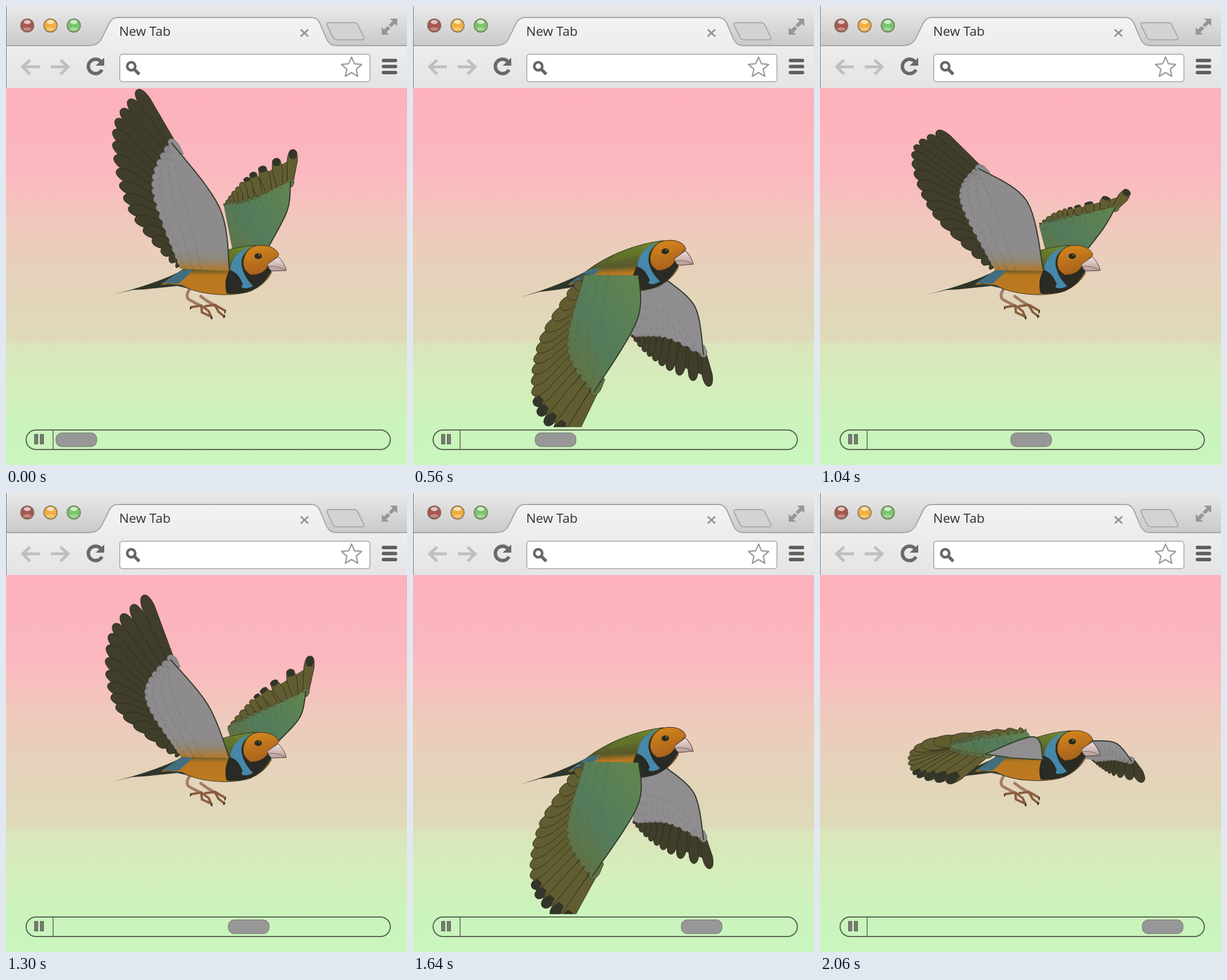
Recreate the animation shown at these times as an HTML page. Size 698 by 800 pixels, loop 2.2 s.

```html
<!DOCTYPE html>
<html lang="en">
<head>
<meta charset="utf-8">
<title>Flying finch</title>
<style>
html, body { margin: 0; width: 100%; height: 100%; overflow: hidden; }
svg { display: block; width: 698px; height: 800px; }
text { font: 22.5px "Open Sans", "Noto Sans", sans-serif; fill: #33332c; }
</style>
</head>
<body>
<svg viewBox="0 0 698 800" xmlns="http://www.w3.org/2000/svg">
  <defs>
    <linearGradient id="sky" gradientUnits="userSpaceOnUse" x1="0" y1="143" x2="0" y2="800">
      <stop offset="0" stop-color="#fdb1bc"/><stop offset=".2" stop-color="#fbb7be"/>
      <stop offset=".25" stop-color="#fabbbf"/><stop offset=".36" stop-color="#f0c8bc"/>
      <stop offset=".5" stop-color="#e5d2ba"/><stop offset=".67" stop-color="#dedaba"/>
      <stop offset=".68" stop-color="#dae5bb"/><stop offset=".78" stop-color="#d5edbb"/>
      <stop offset=".88" stop-color="#ccf3bc"/><stop offset="1" stop-color="#c9f6be"/>
    </linearGradient>
    <linearGradient id="strip" x2="0" y2="1">
      <stop stop-color="#e9e9e9"/><stop offset="1" stop-color="#c9c9c9"/>
    </linearGradient>
    <linearGradient id="tools" gradientUnits="userSpaceOnUse" x1="0" y1="20" x2="0" y2="143">
      <stop stop-color="#f3f3f3"/><stop offset="1" stop-color="#e4e4e4"/>
    </linearGradient>
    <linearGradient id="under" gradientUnits="userSpaceOnUse" x1="0" y1="425" x2="0" y2="464">
      <stop stop-color="#8e8b8e"/><stop offset=".45" stop-color="#8f8878"/><stop offset="1" stop-color="#b8761f"/>
    </linearGradient>
    <linearGradient id="top" x1="0" y1="1" x2="1" y2="0">
      <stop stop-color="#66703a"/><stop offset=".45" stop-color="#547c5c"/><stop offset="1" stop-color="#62854f"/>
    </linearGradient>
    <linearGradient id="plumage" gradientUnits="userSpaceOnUse" x1="0" y1="412" x2="0" y2="505">
      <stop stop-color="#76942a"/><stop offset=".3" stop-color="#5d6b2d"/><stop offset=".5" stop-color="#59592b"/>
      <stop offset=".62" stop-color="#b97720"/><stop offset="1" stop-color="#bd7a20"/>
    </linearGradient>
    <linearGradient id="face" x2=".3" y2="1">
      <stop stop-color="#d8891c"/><stop offset="1" stop-color="#a8621c"/>
    </linearGradient>
    <linearGradient id="bill" x2="0" y2="1">
      <stop stop-color="#efe0dc"/><stop offset="1" stop-color="#b59a97"/>
    </linearGradient>
    <clipPath id="view"><rect y="143" width="698" height="591"/></clipPath>
  </defs>

  <rect y="143" width="698" height="657" fill="url(#sky)"/>

  <g clip-path="url(#view)" stroke-linejoin="round">
    <g id="far"></g>
    <g fill="none" stroke="#8a5c3c" stroke-width="5" stroke-linecap="round">
      <path d="M322 490Q310 506 319 512L340 523M339 506L350 514L365 523" stroke="#a27c68"/>
      <path d="M322 525L340 522L353 532L358 544M340 522L341 534L354 540M347 523L364 521L381 531M364 522L370 533L380 541" stroke-width="4"/>
      <path d="M358 541v4M380 539l-1 4M382 531l-1 4M322 525l-1 3" stroke="#3b2f25" stroke-width="2"/>
    </g>
    <g id="body">
      <path d="M308 460Q265 483 186 503L220 495L240 494L308 487Z" fill="#30362a"/>
      <path d="M436 417C390 420 340 436 302 463L268 486Q300 484 322 494C350 504 395 507 426 497Q452 485 462 465Z" fill="url(#plumage)" stroke="#34361f"/>
      <path d="M303 462L272 483L300 484Q318 470 326 458Z" fill="#426e80"/>
      <path d="M272 483L306 486L320 493L298 488Z" fill="#39413a"/>
      <path d="M396 425Q360 433 340 450Q370 443 400 440Z" fill="#66772a" opacity=".7"/>
      <path d="M389 460Q378 480 384 501Q440 506 461 463L430 460Z" fill="#292b24"/>
      <path d="M430 418C404 425 391 442 391 460Q401 468 411 491Q420 494 430 488Q407 465 410 439Q416 423 430 418Z" fill="#4688aa"/>
      <path d="M391 461Q404 464 412 485L404 500L388 502Q376 483 391 461Z" fill="#292b24"/>
      <path d="M432 418Q409 430 410 452Q415 474 437 477L462 463L450 430Z" fill="#292b24"/>
      <path d="M431 419C448 414 471 419 475 434L458 450Q450 469 426 469Q411 460 413 444Q416 426 431 419Z" fill="url(#face)" stroke="#3a2c18"/>
      <path d="M455 450L474 437Q485 448 488 461L463 462Q457 459 455 450Z" fill="url(#bill)" stroke="#51413c"/>
      <path d="M457 454Q474 452 487 461" fill="none" stroke="#766461"/>
      <ellipse cx="439" cy="436" rx="6.5" ry="5" fill="#292a21"/><circle cx="441" cy="434" r="1.2" fill="#8b8d80"/>
    </g>
    <g id="near"></g>
    <path id="fold" fill="#918e91" stroke="#35452f" stroke-width="2"/>
  </g>

  <rect width="698" height="70" fill="url(#strip)"/>
  <rect y="69" width="698" height="74" fill="url(#tools)"/>
  <path d="M0 69H146Q160 69 166 58L180 29Q185 20 195 20H531Q541 20 546 29L558 58Q563 69 573 69H698" fill="none" stroke="#a5a5a5" stroke-width="2"/>
  <path d="M146 70Q160 70 167 58L181 30Q186 21 195 21H531Q540 21 545 30L557 58Q563 70 573 70Z" fill="url(#tools)"/>
  <path d="M562 29H606Q611 29 613 34L623 55Q624 59 619 59H577Q571 59 569 54L559 34Q557 29 562 29Z" fill="#d3d3d3" stroke="#aaa" stroke-width="2"/>
  <path d="M.5 0V143" stroke="#77786f"/>
  <g id="lights"></g>
  <text x="197" y="52">New Tab</text>
  <path d="M513 41L526 53M526 41L513 53" stroke="#929292" stroke-width="3"/>
  <path d="M681 22V35L677 31L670 37L666 33L673 26L668 22ZM654 50V37L658 41L664 35L669 39L662 46L667 50Z" fill="#969696"/>
  <g fill="none" stroke="#bfbfbf" stroke-width="5">
    <path d="M59 106H30M42 94L29 106L42 119M78 106H107M95 94L108 106L95 119"/>
  </g>
  <path d="M166 98A12.5 12.5 0 1 0 167 111" fill="none" stroke="#696a67" stroke-width="6"/>
  <path d="M171 90V104H156Z" fill="#696a67"/>
  <rect x="198" y="84" width="435.5" height="48" rx="5" fill="#fff" stroke="#b6b6b6" stroke-width="2"/>
  <g fill="none" stroke="#666762" stroke-width="4.5"><circle cx="218" cy="105" r="7"/><path d="M223 110L232 119" stroke-width="5.5"/></g>
  <path id="star" fill="#fff" stroke="#999" stroke-width="2.2" stroke-linejoin="round"/>
  <path d="M657 95H678M657 105.500H678M657 116H678" stroke="#5f605c" stroke-width="6" stroke-linecap="round"/>

  <rect x="35" y="739" width="634" height="34" rx="17" fill="none" stroke="#5c6655" stroke-width="2"/>
  <path d="M82 739V773" stroke="#5c6655" stroke-width="1.500"/>
  <path d="M49.500 746.500h6v17h-6zM59.500 746.500h6v17h-6z" fill="#777b72" stroke="#5c6655"/>
  <rect id="thumb" x="87" y="744" width="71" height="24" rx="10" fill="#979797" stroke="#70736b"/>
</svg>
<script>
const LOOP = 2200, LAST = 2060, BEAT = 1100;
const $ = id => document.getElementById(id);
const add = (parent, tag, attrs) => {
  const el = document.createElementNS("http://www.w3.org/2000/svg", tag);
  set(el, attrs);
  return parent.appendChild(el);
};
function set(el, attrs) { for (const k in attrs) el.setAttribute(k, attrs[k]); }

// Wing poses over one beat. Points: shoulder, leading edge, wrist, tip,
// two along the trailing edge, root, middle of the covert border.
const times = [0, 200, 340, 540, 800, 960, 1040];
const parse = s => s.split(" ").map(p => p.split(",").map(Number));
const nearPoses = [
  "389,462 372,352 288,238 228,146 187,215 212,350 304,458 258,320",
  "389,462 352,370 286,290 239,178 180,245 190,370 305,460 246,355",
  "390,462 372,490 258,502 158,506 148,490 178,478 300,464 245,490",
  "393,470 391,545 312,668 258,755 208,690 220,582 300,468 271,590",
  "391,460 352,566 325,632 300,748 228,675 204,572 290,465 263,560",
  "388,465 372,425 288,455 220,504 162,490 175,440 362,417 230,440",
  "389,462 360,340 276,283 203,218 160,255 195,358 305,460 248,340"
].map(parse);
const farPoses = [
  "458,418 490,355 495,305 500,250 435,285 400,318 379,348 425,340",
  "475,432 512,390 522,345 530,284 453,335 415,373 385,410 450,380",
  "415,493 480,493 533,490 560,471 520,476 490,472 455,464 500,480",
  "440,478 490,525 506,605 517,655 455,633 410,604 382,572 440,572",
  "450,466 508,498 524,585 526,667 465,630 425,577 383,510 455,550",
  "470,432 515,436 543,468 562,504 515,494 490,480 473,465 510,464",
  "467,422 495,385 515,350 537,321 455,345 415,358 381,382 432,370"
].map(parse);
const lifts = [0, 0, -6, -9, -7, -3, 0];

// Smooth periodic interpolation; get(k) gives the value at key k.
function cycle(get, phase) {
  const n = times.length;
  const at = k => get((k + n) % n);
  const when = k => times[(k + n) % n] + BEAT * Math.floor(k / n);
  let k = n - 1;
  while (times[k] > phase) k--;
  const span = when(k + 1) - when(k), u = (phase - when(k)) / span;
  const slope = j => (at(j + 1) - at(j - 1)) / (when(j + 1) - when(j - 1)) * span;
  const u2 = u * u, u3 = u2 * u;
  return (2 * u3 - 3 * u2 + 1) * at(k) + (u3 - 2 * u2 + u) * slope(k)
    + (3 * u2 - 2 * u3) * at(k + 1) + (u3 - u2) * slope(k + 1);
}
const poseAt = (poses, phase) => poses[0].map((_, p) =>
  [0, 1].map(axis => cycle(k => poses[k][p][axis], phase)));

const mix = (a, b, u) => [a[0] + (b[0] - a[0]) * u, a[1] + (b[1] - a[1]) * u];
const fmt = p => p[0].toFixed(1) + "," + p[1].toFixed(1);
const poly = pts => "M" + pts.map(fmt).join("L");

function spline(pts, u) {
  const n = pts.length - 1, i = Math.min(n - 1, Math.floor(u * n)), v = u * n - i;
  const a = pts[Math.max(0, i - 1)], b = pts[i], c = pts[i + 1], d = pts[Math.min(n, i + 2)];
  return [0, 1].map(k => b[k] + .5 * v * (c[k] - a[k]
    + v * (2 * a[k] - 5 * b[k] + 4 * c[k] - d[k] + v * (3 * (b[k] - c[k]) + d[k] - a[k]))));
}
const sample = (pts, n = 20) => Array.from({ length: n + 1 }, (_, i) => spline(pts, i / n));

function leaf(from, to, half) {
  const dx = to[0] - from[0], dy = to[1] - from[1], len = Math.hypot(dx, dy) || 1;
  const at = (along, side) => fmt([
    from[0] + (dx * along - dy * side * half) / len,
    from[1] + (dy * along + dx * side * half) / len]);
  const neck = Math.max(len * .55, len - half * 2.2);
  return `M${at(0, .6)}L${at(neck, 1)}Q${at(len, .9)} ${at(len, 0)}Q${at(len, -.9)} ${at(neck, -1)}L${at(0, -.6)}Z`;
}

function makeWing(group, poses, count, maxHalf, base) {
  const bed = add(group, "path", {});
  const feathers = Array.from({ length: count }, () => add(group, "path", { stroke: "#282a1c", "stroke-width": .9 }));
  const tips = add(group, "path", { fill: "#32332a" });
  const scallops = add(group, "path", { "stroke-width": 1 });
  const coverts = add(group, "path", {});
  const texture = add(group, "path", { fill: "none", stroke: "#283329", opacity: .2 });
  const rim = add(group, "path", { fill: "none", stroke: "#303c2a", "stroke-width": 2 });

  return (phase, under, covertFill) => {
    const [a, b, c, d, p, q, r, mid] = poseAt(poses, phase);
    const lead = [a, b, c], border = [c, mid, r], edge = [d, p, q, r];
    const us = Array.from({ length: count }, (_, i) => (i / (count - 1)) ** .75);
    const inner = us.map(u => spline(border, u)), outer = us.map(u => spline(edge, u));
    const color = under ? "#403e2a" : "#625d31";
    set(bed, { fill: color, d: poly([...inner, ...outer.map((o, i) => mix(inner[i], o, .7)).reverse()]) + "Z" });

    let dark = "", dots = "", rows = "";
    inner.forEach((from, i) => {
      const j = Math.min(i, count - 2);
      const gap = Math.hypot(outer[j + 1][0] - outer[j][0], outer[j + 1][1] - outer[j][1]);
      const half = Math.max(maxHalf * .45, Math.min(maxHalf, gap * .58));
      set(feathers[i], { fill: color, d: leaf(from, outer[i], half) });
      if (i < 5) dark += leaf(mix(from, outer[i], .7 + i * .03), outer[i], half * .85);
      if (i < count - 1) dots += leaf(mix(from, b, .2), mix(from, outer[i], .06), maxHalf * .75);
      const front = spline(lead, 1 - us[i]);
      for (const v of [.15, .32, .5]) {
        const [x, y] = mix(from, front, v), s = maxHalf * .5;
        rows += `M${fmt([x - s, y - s])}q${-s} ${s} ${s * .6} ${s * 1.6}`;
      }
    });
    set(tips, { d: dark, opacity: under ? 0 : .95 });
    set(scallops, { d: dots, fill: under ? "#8e8b8e" : "#617044", stroke: under ? "#77747a" : "#414d34" });
    const front = sample(lead);
    set(coverts, { d: poly([...front, ...sample(border), ...base]) + "Z", fill: covertFill });
    set(texture, { d: rows });
    set(rim, { d: poly(front) });
  };
}

const drawFar = makeWing($("far"), farPoses, 12, 9, [[400, 455]]);
const drawNear = makeWing($("near"), nearPoses, 18, 11, []);

["#a85751", "#f1ad3d", "#79c56c"].forEach((fill, i) => {
  const cx = 37 + i * 40.5;
  add($("lights"), "circle", { cx, cy: 34, r: 11.5, fill, stroke: "#77705f", "stroke-width": 1.5 });
  add($("lights"), "ellipse", { cx, cy: 28, rx: 6, ry: 3.5, fill: "#fff", opacity: .65 });
  add($("lights"), "ellipse", { cx, cy: 40, rx: 7, ry: 3, fill: "#fff", opacity: .3 });
});
set($("star"), { d: poly(Array.from({ length: 10 }, (_, i) => {
  const r = i % 2 ? 8.5 : 18.5, w = i * Math.PI / 5;
  return [601.5 + r * Math.sin(w), 107.5 - r * Math.cos(w)];
})) + "Z" });

const track = [[0, 87], [340, 163], [800, 267], [1040, 332], [1300, 387], [1640, 467], [LAST, 561]];
function thumbX(t) {
  const k = Math.max(1, track.findIndex(([when]) => when >= t));
  const [t0, x0] = track[k - 1], [t1, x1] = track[k];
  return x0 + (x1 - x0) * (t - t0) / (t1 - t0);
}

function draw(now) {
  const t = Math.min(LAST, Math.floor(now % LOOP / 20) * 20), phase = t % BEAT;
  const raised = phase < 275 || phase > 990;
  drawFar(phase, !raised, raised ? "url(#top)" : "#908d90");
  drawNear(phase, raised, raised ? "url(#under)" : "url(#top)");

  const [a, b, c] = poseAt(nearPoses, phase);
  const folding = phase > 900 && !raised;
  set($("fold"), { d: poly([...sample([a, b, c]), [335, 462]]) + "Z", visibility: folding ? "visible" : "hidden" });

  const lift = cycle(k => lifts[k], phase);
  const tilt = Math.atan(lift / 170) * 180 / Math.PI;
  set($("body"), { transform: `translate(280 0) skewY(${tilt.toFixed(3)}) translate(-280 0)` });
  set($("thumb"), { x: thumbX(t).toFixed(1) });
}

function tick() {
  draw(performance.now());
  requestAnimationFrame(tick);
}
tick();
</script>
</body>
</html>
```
